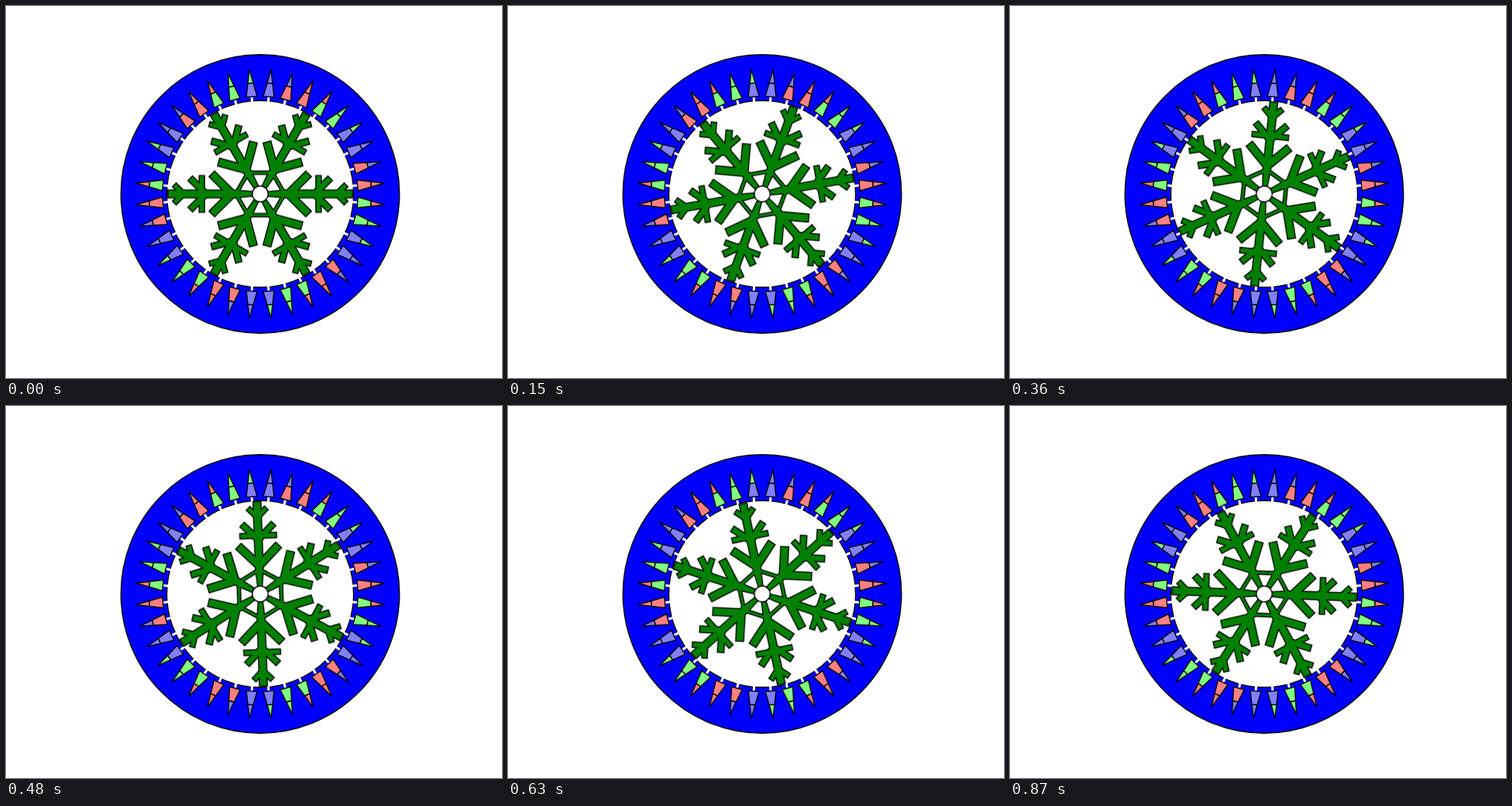
An HTML page without scripts for the animation above (0.9 s loop, 640 by 480 pixels).

```html
<!DOCTYPE html>
<html lang="en">
<head>
<meta charset="utf-8">
<title>Turning snowflake</title>
<style>
  html, body { margin: 0; width: 100%; height: 100%; overflow: hidden; background: #fff; }
  svg { display: block; width: 640px; height: 480px; }
  .red-base { color: #ff8080; }
  .green-base { color: #80ff80; }
  .blue-base { color: #8080ff; }
  .red-tip { fill: #ff8080; }
  .green-tip { fill: #80ff80; }
  .blue-tip { fill: #8080ff; }
  .turning { animation: turn 900ms steps(30, end) infinite; }
  @keyframes turn { to { transform: rotate(-60deg); } }
</style>
</head>
<body>
<svg viewBox="0 0 640 480">
  <defs>
    <g id="cone" stroke="#000" stroke-width="1.4">
      <path d="M0-118.5V-125.5" stroke="#fff" stroke-width="3"/>
      <path d="M-7-126H7L3.5-143.5H-3.5Z" fill="currentColor"/>
      <path d="M-3.5-143.5H3.5L0-161Z"/>
    </g>
    <g id="sector">
      <use href="#cone" class="blue-base blue-tip" transform="rotate(5)"/>
      <use href="#cone" class="red-base blue-tip" transform="rotate(15)"/>
      <use href="#cone" class="red-base red-tip" transform="rotate(25)"/>
      <use href="#cone" class="green-base red-tip" transform="rotate(35)"/>
      <use href="#cone" class="green-base green-tip" transform="rotate(45)"/>
      <use href="#cone" class="blue-base green-tip" transform="rotate(55)"/>
    </g>

    <!-- One side's twigs, growing outward along +x -->
    <g id="twigs">
      <rect width="36" height="9" y="-4.5" transform="translate(36.5) rotate(45)"/>
      <rect x="72.5" width="5.6" height="23"/>
      <rect width="28" height="7" y="-3.5" transform="translate(70) rotate(45)"/>
      <rect width="16" height="5.6" y="-2.8" transform="translate(99) rotate(45)"/>
    </g>
    <g id="arm">
      <path d="M8-2.2L32-4.4H118.4V4.4H32L8 2.2Z"/>
      <use href="#twigs"/>
      <use href="#twigs" transform="scale(1 -1)"/>
      <path d="M29.8 0L14.9 25.8L16.6 28.8L33.2 0Z"/>
    </g>
    <g id="flake">
      <use href="#arm"/>
      <use href="#arm" transform="rotate(60)"/>
      <use href="#arm" transform="rotate(120)"/>
      <use href="#arm" transform="rotate(180)"/>
      <use href="#arm" transform="rotate(240)"/>
      <use href="#arm" transform="rotate(300)"/>
    </g>
  </defs>

  <g transform="translate(328 242.5)">
    <g stroke="#000" stroke-width="1.4">
      <circle r="179.7" fill="#00f"/>
      <circle r="120.5" fill="#fff"/>
    </g>
    <use href="#sector"/>
    <use href="#sector" transform="rotate(60)"/>
    <use href="#sector" transform="rotate(120)"/>
    <use href="#sector" transform="rotate(180)"/>
    <use href="#sector" transform="rotate(240)"/>
    <use href="#sector" transform="rotate(300)"/>

    <!-- Outline first, then fill, so overlapping parts merge -->
    <g class="turning">
      <use href="#flake" stroke="#000" stroke-width="2.8"/>
      <use href="#flake" fill="#008000"/>
      <circle r="10.3" fill="#fff" stroke="#000" stroke-width="1.4"/>
    </g>
  </g>
</svg>
</body>
</html>
```
